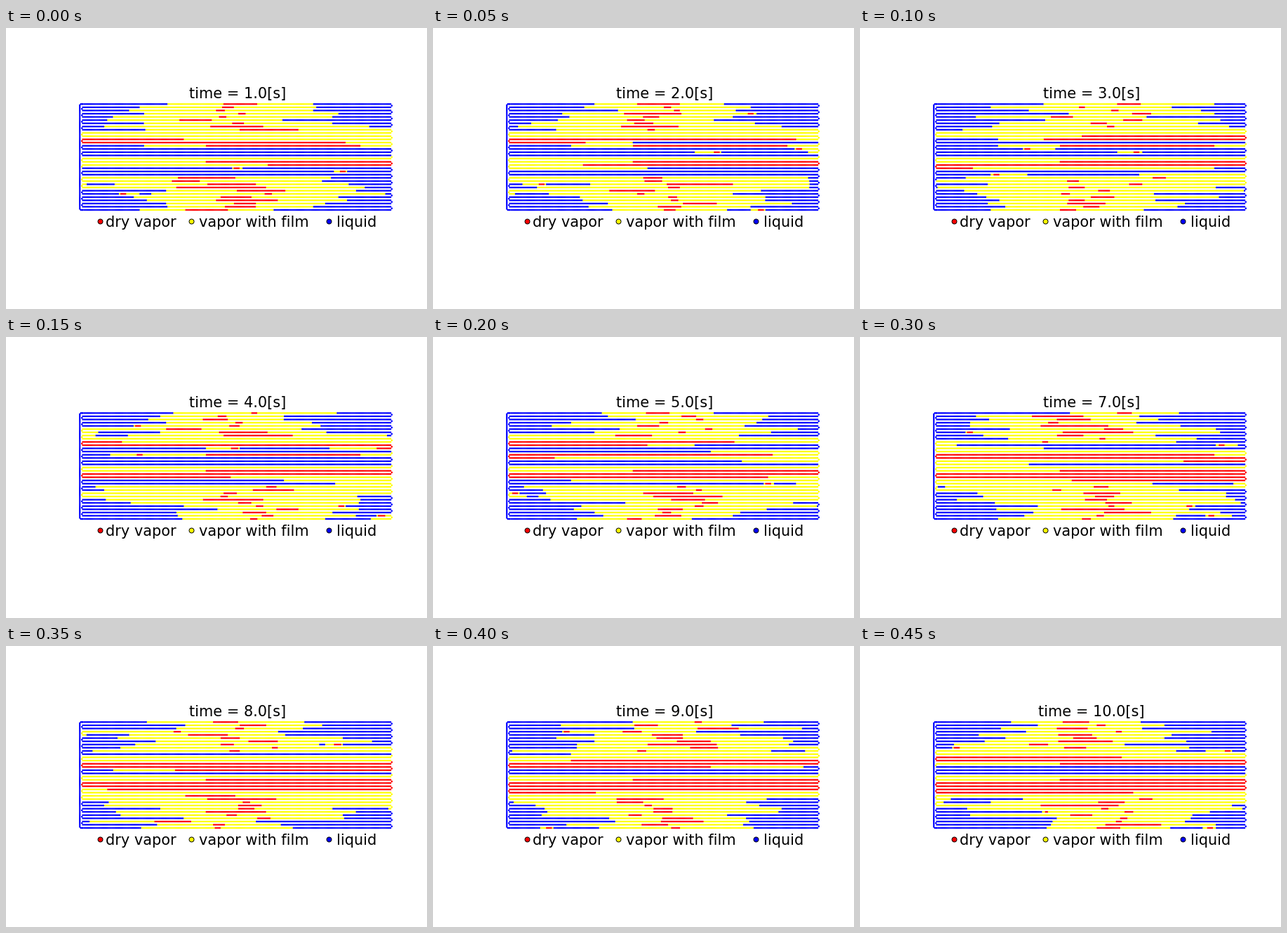
A matplotlib script that plays this animation: 600 by 400 pixels, repeating every 0.5 s.

```python
import numpy as np
import matplotlib.pyplot as plt
from matplotlib.animation import FuncAnimation

W, H, DPI = 600, 400, 100
ROWS, TOP, BOTTOM = 34, 108.3, 259.0
LEFT, RIGHT, LEG_X = 109.6, 548.0, 105.2
LIQUID, FILM, DRY = range(3)
PALETTE = np.array(["blue", "yellow", "red"])
FONT = {"family": "DejaVu Sans", "size": 15}
HOT_ROWS = range(10, 23)


def build_tube():
    """Dots of the closed serpentine: x, y and position counted in rows."""
    pitch = (BOTTOM - TOP) / (ROWS - 1)
    step = np.linspace(0, 1, 210)
    parts = []

    def add(x, y, s):
        parts.append(np.broadcast_arrays(np.atleast_1d(x), y, s))

    for row in range(ROWS):
        y = TOP + row * pitch
        u = step if row % 2 == 0 else 1 - step
        add(LEFT + (RIGHT - LEFT) * u, y, row + 0.003 + 0.994 * step)
        if row < ROWS - 1:
            tip = 549.8 if row % 2 == 0 else 108.2
            add(tip, y + pitch / 2, row + 1)
    for x in (106.7, 108.3):
        add(x, [TOP, BOTTOM], [0, ROWS])
    leg = np.linspace(BOTTOM - 1.6, TOP + 1.6, 72)
    add(LEG_X, leg, ROWS + (BOTTOM - leg) / (RIGHT - LEFT))
    return np.concatenate(parts, axis=1)


X, Y, S = build_tube()


def tube_state(t):
    """Phase of every dot at second t."""
    rng = np.random.default_rng(40 + t)
    state = np.full(len(S), LIQUID)

    def bubble(tail, head, dry_tail, dry_head):
        state[(S >= tail) & (S <= head)] = FILM
        state[(S >= dry_tail) & (S <= dry_head)] = DRY

    # short-lived bubbles anywhere in the loop
    for tail in rng.uniform(0, ROWS, 10):
        bubble(tail, tail + rng.uniform(.03, .12), tail + .006, tail + .026)

    # about one bubble per cooler row, longer towards the hot middle
    for row in range(ROWS):
        warmth = np.exp(-((row - 17) / 10) ** 2)
        mid = row + .5 + rng.normal(0, .08)
        half = (.2 + .45 * warmth) * rng.uniform(.75, 1.25)
        dry = .01 + .3 * half * rng.random() ** 2
        if row not in HOT_ROWS:
            bubble(mid - half, mid + half, mid - dry, mid + dry)

    # hot zone: one bubble drifts up and collapses, one grows, one wakes late
    age = t - 1
    if t <= 6:
        drift = .6 * age
        bubble(8.7 - .23 * age, 13 - drift, 11.67 - drift, 12.85 - drift)
    bubble(17, 20 + .45 * age, 18.4, 19.4 + .36 * age)
    wake = [4, 6, 8, 10]
    bubble(np.interp(t, wake, [13, 12.3, 11, 9.4]),
           np.interp(t, wake, [13.8, 16.7, 15.9, 14]),
           np.interp(t, wake, [13.1, 13.2, 13, 11.4]),
           np.interp(t, wake, [13.6, 14.7, 15.7, 13.6]))
    return state


fig = plt.figure(figsize=(W / DPI, H / DPI), dpi=DPI, facecolor="white")
ax = fig.add_axes([0, 0, 1, 1])
ax.set_xlim(0, W)
ax.set_ylim(H, 0)
ax.axis("off")

dots = ax.scatter(X, Y, s=3.4, linewidths=0)
title = ax.text(329.7, 100, "", ha="center", va="baseline", **FONT)

for dot_x, text_x, phase, label in [
    (134, 142, DRY, "dry vapor"),
    (264.2, 274.6, FILM, "vapor with film"),
    (460.3, 471, LIQUID, "liquid"),
]:
    ax.plot(dot_x, 275.2, "o", ms=5, mfc=PALETTE[phase], mec="black", mew=.7)
    ax.text(text_x, 283, label, va="baseline", **FONT)


def update(frame):
    t = frame + 1
    dots.set_facecolor(PALETTE[tube_state(t)])
    title.set_text(f"time = {t:.1f}[s]")
    return dots, title


anim = FuncAnimation(fig, update, frames=10, interval=50, repeat=True,
                     repeat_delay=0, blit=False)
plt.show()
```
